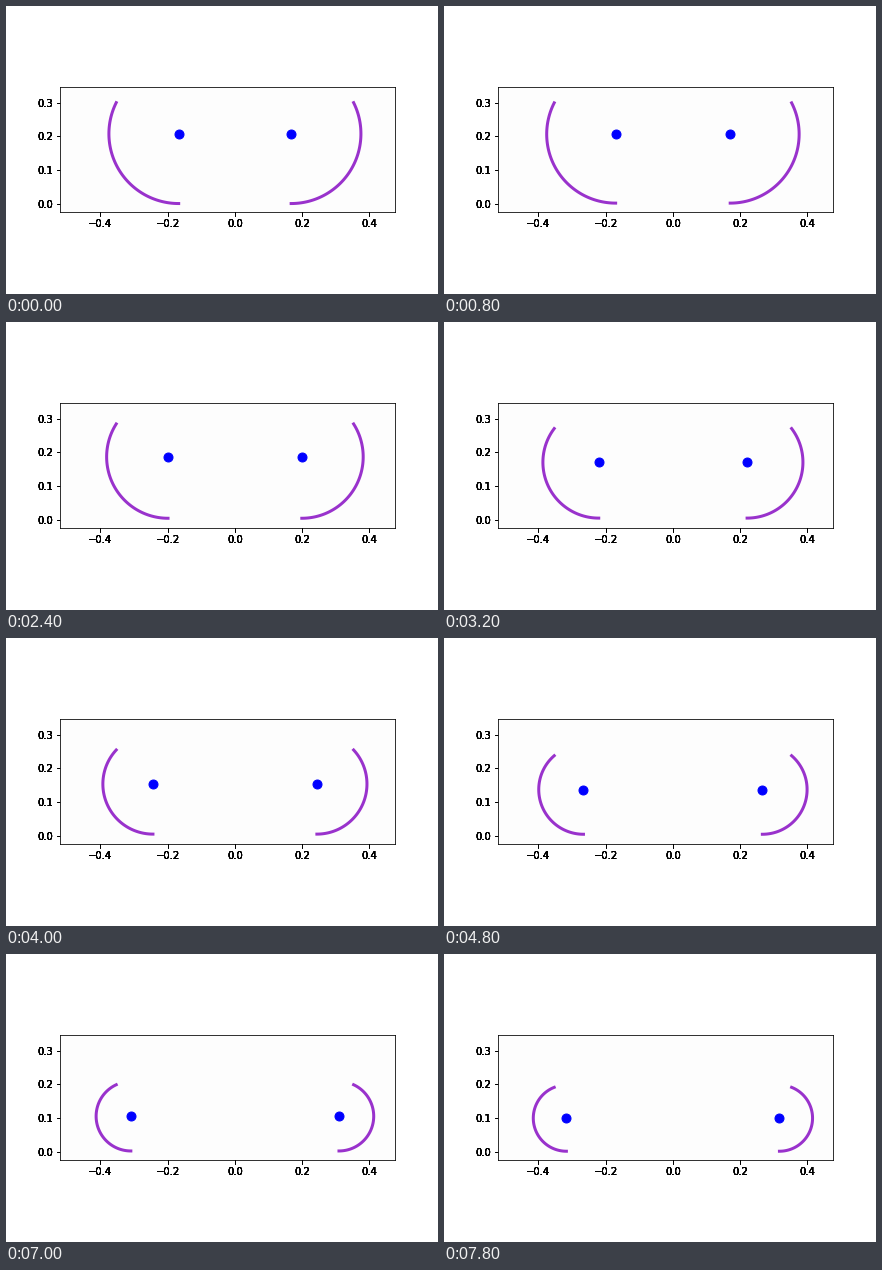
Recreate the animation shown at these times as a matplotlib script. Size 432 by 288 pixels, loop 8000 ms.

```python
import math

import matplotlib.pyplot as plt
import numpy as np
from matplotlib.animation import FuncAnimation

FRAMES, INTERVAL = 40, 200
HALF_TOP = 0.353                # half width of the rigid top
HALF_SKIN = 3 * math.pi / 16    # half length of the flexible skin
START_Y = 0.3
MASS, PRESSURE, GRAVITY = 100, 2000, 9.8
DT = 0.01


def skin_shape(y):
    """Contact half width, radius and end angle for a top at height y."""
    lo, hi = 0.0, math.pi / 2
    for _ in range(50):
        a = (lo + hi) / 2
        r = y / (1 + math.sin(a))
        length = HALF_TOP + r * (a + math.pi / 2 - math.cos(a))
        lo, hi = (a, hi) if length < HALF_SKIN else (lo, a)
    return HALF_TOP - r * math.cos(a), r, a


def simulate():
    y, v = START_Y, 0.0
    shapes = []
    for _ in range(FRAMES):
        shape = skin_shape(y)
        shapes.append(shape)
        y += v * DT
        v += (PRESSURE * 2 * shape[0] / MASS - GRAVITY) * DT
    return shapes


shapes = simulate()

plt.rcParams.update({"font.family": "DejaVu Sans", "font.size": 10})
fig = plt.figure(figsize=(6, 4), dpi=72, facecolor="white")
box = [0.125, 0.2855, 0.775, 0.434]


def make_axes(**style):
    ax = fig.add_axes(box, **style)
    ax.set(xlim=(-0.5202, 0.4755), ylim=(-0.0245, 0.3472),
           xticks=[-0.4, -0.2, 0, 0.2, 0.4], yticks=[0, 0.1, 0.2, 0.3])
    return ax


# Stacked labels give the heavy, hard-edged tick text.
for _ in range(5):
    make_axes(frameon=False)
ax = make_axes(facecolor="#fdfdfd")

arcs = [ax.plot([], [], color="darkorchid", lw=3)[0] for _ in range(2)]
dots, = ax.plot([], [], "bo", ms=9)


def update(i):
    x, r, end = shapes[i]
    cy = shapes[max(i - 1, 0)][1]
    a = np.linspace(-math.pi / 2, end, 100)
    for side, arc in zip((-1, 1), arcs):
        arc.set_data(side * (x + r * np.cos(a)), cy + r * np.sin(a))
    dots.set_data([-x, x], [cy, cy])
    return [*arcs, dots]


anim = FuncAnimation(fig, update, frames=FRAMES, interval=INTERVAL,
                     init_func=lambda: update(0), repeat=True, blit=False)
plt.show()
```
